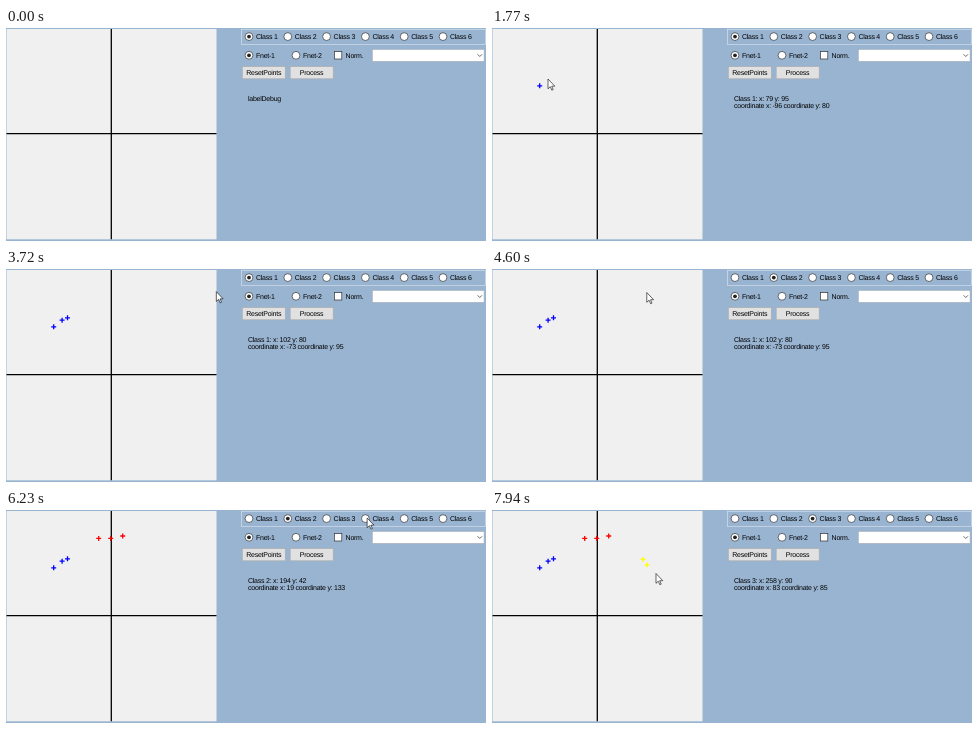
Write an HTML page that moves like this. It is 480 by 213 pixels and loops after 7990 ms.

```html
<!DOCTYPE html>
<html lang="en">
<head>
<meta charset="utf-8">
<title>Point classes</title>
<style>
  html, body { margin: 0; width: 100%; height: 100%; overflow: hidden; background: #99b4d1; }
  svg { display: block; width: 480px; height: 213px; }
  text { font: 7px "Liberation Sans", Arial, sans-serif; letter-spacing: -.25px; text-rendering: geometricPrecision; white-space: pre; }
  .ring { fill: #fff; stroke: #333; stroke-width: .7; }
  .button { fill: #e1e1e1; stroke: #adadad; stroke-width: .7; }
</style>
</head>
<body>
<svg viewBox="0 0 480 213">
  <rect x=".5" y="1" width="210" height="210.3" fill="#f0f0f0"/>
  <path d="M.5 105.6H210.5M105.3 1V211.3" stroke="#000" stroke-width="1.3"/>
  <rect x="235.4" y="1.3" width="244" height="15.2" fill="none" stroke="#d3dfec" stroke-width=".7"/>
  <g id="form"></g>
  <rect class="ring" x="328.4" y="23.6" width="7.4" height="7.4"/>
  <rect x="366.3" y="21.4" width="111.8" height="12" fill="#fff" stroke="#a5acb5" stroke-width=".6"/>
  <path d="M471.6 26.3l2.2 2.2 2.2-2.2" fill="none" stroke="#444" stroke-width=".8"/>
  <g id="points" stroke-width="1.3"></g>
  <path id="cursor" d="M0 0V9.8L2.3 7.7 3.8 11.2 5.2 10.6 3.7 7.2H6.8Z" fill="#fff" stroke="#000" stroke-width=".6"/>
</svg>
<script>
const LOOP = 7990, ENTER = 170, SCALE = .6, CENTER = 175, REST = 40;
const COLORS = ['#00f', '#f00', '#ff0'];
const $ = id => document.getElementById(id);

function add(parent, tag, attrs, content = '') {
  const el = document.createElementNS('http://www.w3.org/2000/svg', tag);
  for (const key in attrs) el.setAttribute(key, attrs[key]);
  el.textContent = content;
  return parent.appendChild(el);
}
const label = (x, y, content) => add($('form'), 'text', { x, y }, content);
const show = (el, on) => el.style.display = on ? '' : 'none';

function radio(x, y, name) {
  add($('form'), 'circle', { class: 'ring', cx: x, cy: y, r: 3.9 });
  label(x + 7, y + 2.6, name);
  return add($('form'), 'circle', { cx: x, cy: y, r: 1.9, fill: '#222' });
}

function button(x, name) {
  add($('form'), 'rect', { class: 'button', x, y: 38.6, width: 43, height: 12.2 });
  add($('form'), 'text', { x: x + 21.4, y: 47.2, 'text-anchor': 'middle' }, name);
}

const classDots = [1, 2, 3, 4, 5, 6].map(n => radio(204.2 + 38.8 * n, 8.6, 'Class ' + n));
radio(243, 27.3, 'Fnet-1');
show(radio(290, 27.3, 'Fnet-2'), false);
label(339.6, 29.9, 'Norm.');
button(236.3, 'ResetPoints');
button(284.2, 'Process');
const debug = [label(242, 72.6, ''), label(242, 80.3, '')];

const classAt = t => t < 4150 ? 0 : t < 6600 ? 1 : 2;

// clicks: time, x, y in panel units
const clicks = [
  [1520, 79, 95], [1800, 93, 84], [3220, 102, 80],
  [5050, 154, 46], [5380, 174, 46], [5750, 194, 42],
  [7570, 251, 81], [7780, 258, 90]
];
const marks = clicks.map(([t, x, y]) => add($('points'), 'path', {
  d: `M${x * SCALE - 2.2} ${y * SCALE + .8}h5m-2.5-2.5v5`, stroke: COLORS[classAt(t)]
}));

// the cursor rests around each click and passes these places between them
const path = clicks.flatMap(([t, x, y]) =>
  [t - REST, t + REST].map(time => [time, x * SCALE + .2, y * SCALE + .6])
).concat([
  [ENTER, 406, 206], [930, 46, 53], [2400, 272, 5], [2870, 94, 45], [4050, 300, 7],
  [4600, 155, 23.5], [5590, 112, 26.5], [6300, 374, 7], [6600, 328, 8],
  [6990, 173.3, 30.7], [7360, 150, 48.8], [7940, 164, 63.5]
]).sort((a, b) => a[0] - b[0]);

// zero at turning points and rests, else the slope across the neighbours
function velocity(i, axis) {
  const a = path[i - 1], b = path[i], c = path[i + 1];
  if (!a || !c || (b[axis] - a[axis]) * (c[axis] - b[axis]) <= 0) return 0;
  return (c[axis] - a[axis]) / (c[0] - a[0]);
}

function position(t, axis) {
  const next = path.findIndex(key => key[0] > t);
  if (next < 0) return path[path.length - 1][axis];
  const a = path[next - 1], b = path[next], span = b[0] - a[0];
  const u = (t - a[0]) / span, v = 1 - u;
  return v * v * (1 + 2 * u) * a[axis] + u * u * (3 - 2 * u) * b[axis]
    + span * u * v * (v * velocity(next - 1, axis) - u * velocity(next, axis));
}

function draw() {
  const t = performance.now() % LOOP;
  classDots.forEach((dot, i) => show(dot, i === classAt(t)));

  const placed = clicks.filter(click => click[0] <= t);
  marks.forEach((mark, i) => show(mark, i < placed.length));
  const lines = ['labelDebug', ''];
  if (placed.length) {
    const [time, x, y] = placed[placed.length - 1];
    lines[0] = `Class ${classAt(time) + 1}: x: ${x} y: ${y}`;
    lines[1] = `coordinate x: ${x - CENTER} coordinate y: ${CENTER - y}`;
  }
  debug.forEach((el, i) => el.textContent = lines[i]);

  show($('cursor'), t >= ENTER);
  if (t >= ENTER) $('cursor').setAttribute('transform', `translate(${position(t, 1)} ${position(t, 2)})`);
  requestAnimationFrame(draw);
}
draw();
</script>
</body>
</html>
```
